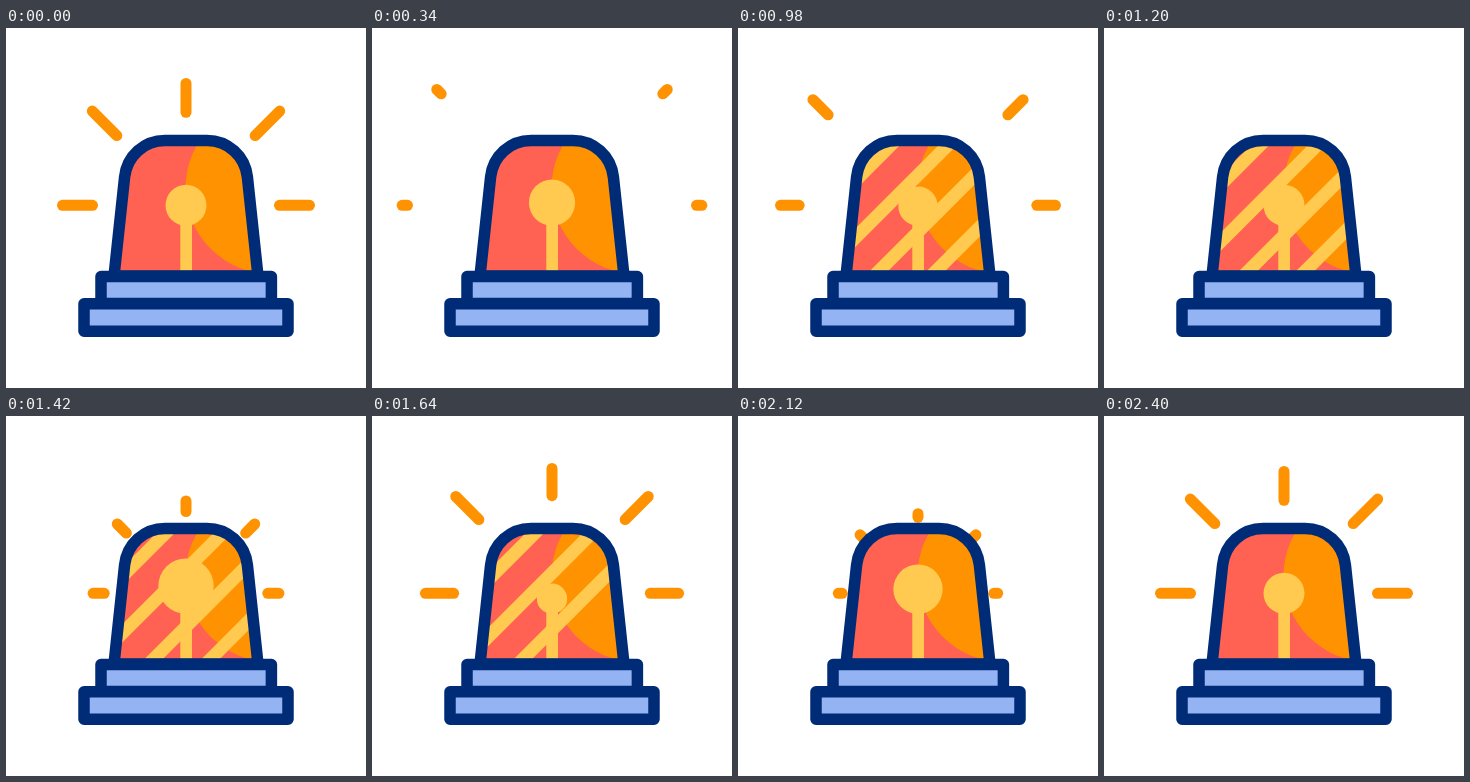
An HTML page for the animation above (2.42 s loop, 360 by 360 pixels).

```html
<!DOCTYPE html>
<html lang="en">
<head>
<meta charset="utf-8">
<title>Siren</title>
<style>
  html, body { margin: 0; width: 100%; height: 100%; overflow: hidden; background: #fff; }
  svg { display: block; width: 100vw; height: 100vh; }
  .line { stroke: #002c77; stroke-width: 11.5; stroke-linejoin: round; }
  #rays { stroke: #ff9200; stroke-width: 11; stroke-linecap: round; }
  #shine { stroke: #ffca4f; stroke-width: 13; }
</style>
</head>
<body>
<svg viewBox="0 0 360 360">
  <defs>
    <path id="dome" d="M108 248L118.6 149C121 128 138 112.5 159 112.5H201C222 112.5 239 128 241.4 149L252 248Z"/>
    <clipPath id="glass"><use href="#dome"/></clipPath>
  </defs>
  <g id="rays">
    <line id="top"/>
    <g id="left"><line id="side"/><line id="slant"/></g>
    <use href="#left" transform="matrix(-1 0 0 1 360 0)"/>
  </g>
  <g clip-path="url(#glass)">
    <rect x="100" y="105" width="160" height="145" fill="#ff6152"/>
    <circle cx="265.5" cy="160" r="86" fill="#ff9200"/>
    <g id="shine"></g>
    <g fill="#ffca4f">
      <rect x="174.3" y="185" width="11.7" height="60"/>
      <circle id="lamp" cx="180"/>
    </g>
  </g>
  <use href="#dome" class="line" fill="none"/>
  <rect class="line" x="95" y="248.5" width="170.4" height="27" fill="#94b3f2"/>
  <rect class="line" x="78" y="275.8" width="204" height="27.4" fill="#94b3f2"/>
</svg>
<script>
const LOOP = 2420, SPAN = 2400, STEP = 20;
const RAY_CYCLE = 800, LAMP_CYCLE = 600;
const STRIPES = 9, GAP = 57, SPEED = 0.503;

const $ = id => document.getElementById(id);
const lerp = (a, b, p) => a + (b - a) * p;
const smooth = p => p * p * (3 - 2 * p);

function setLine(line, x1, y1, x2, y2) {
  Object.entries({ x1, y1, x2, y2 }).forEach(([k, v]) => line.setAttribute(k, v));
}

// Travel from 0 to 1 through mid at half time, with one power curve per half.
const travel = (p, mid, first, second) => p < .5
  ? mid * (2 * p) ** first
  : lerp(mid, 1, (2 * p - 1) ** second);

// Each ray is the stretch between two points running along a track.
function drawRays(t) {
  const p = (t / RAY_CYCLE + .5) % 1;
  const outer = travel(p, .633, 1.42, 1), inner = travel(p, .278, 1.15, 1.1);
  const ray = (id, x1, y1, x2, y2) => setLine($(id),
    lerp(x1, x2, inner), lerp(y1, y2, inner), lerp(x1, x2, outer), lerp(y1, y2, outer));
  ray("top", 180, 107, 180, 25.5);
  ray("side", 110, 177.3, 25.5, 177.3);
  ray("slant", 130, 126.7, 61, 57.7);
  $("rays").style.display = p ? "" : "none";
  // The top ray skips its outward half until the second burst is nearly over.
  $("top").style.display = p > .5 && t < 1080 ? "none" : "";
}

const stripes = Array.from({ length: STRIPES }, () =>
  $("shine").appendChild(document.createElementNS("http://www.w3.org/2000/svg", "line")));

// Diagonal stripes x + y = c cross the glass once at constant speed.
function drawShine(t) {
  stripes.forEach((stripe, i) => {
    const c = 270 - SPEED * (t - 980) + i * GAP;
    setLine(stripe, c - 265, 265, c - 95, 95);
  });
}

function drawLamp(t) {
  const keys = [[0, 20.5], [245, 27.9], [490, 13.6], [LAMP_CYCLE, 20.5]];
  const phase = t % LAMP_CYCLE;
  const i = keys.findIndex(([at]) => at > phase);
  const [t0, r0] = keys[i - 1], [t1, r1] = keys[i];
  const r = lerp(r0, r1, smooth((phase - t0) / (t1 - t0)));
  $("lamp").setAttribute("r", r);
  $("lamp").setAttribute("cy", 197.8 - r);
}

const start = performance.now();
function render() {
  const now = Math.max(0, performance.now() - start) % LOOP;
  const t = Math.min(SPAN, Math.floor(now / STEP) * STEP);
  drawRays(t);
  drawShine(t);
  drawLamp(t);
  requestAnimationFrame(render);
}
render();
</script>
</body>
</html>
```
